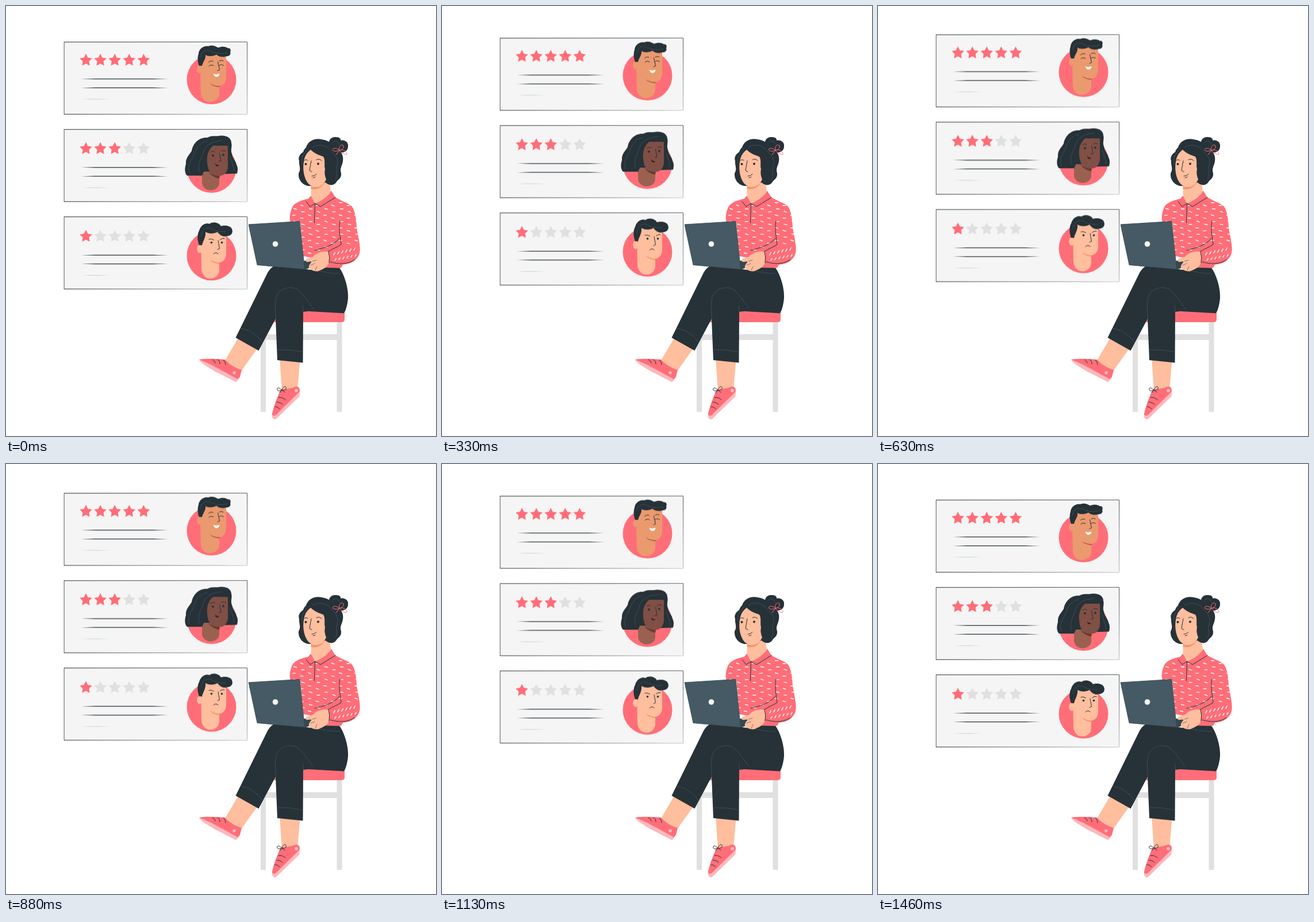
Animation, 748 px wide and 748 px high, one loop 1.5 s. Source, as an HTML page:

```html
<!DOCTYPE html>
<html lang="en">
<head>
<meta charset="utf-8">
<title>Customer reviews</title>
<style>
  html, body { margin: 0; width: 100%; height: 100%; overflow: hidden; background: #fff; }
  svg { display: block; width: 100vw; height: 100vh; }
  .pink { fill: #ff6e78; }
  .pale { fill: #ffb8bd; }
  .dark { fill: #263238; }
  .grey { fill: #e0e0e0; }
  .skin { fill: #ffbe9d; }
  .tan { fill: #eb996e; }
  .ink, .thin, .dash { fill: none; stroke: #263238; stroke-linecap: round; stroke-linejoin: round; }
  .ink { stroke-width: 1; }
  .thin { stroke: #455a64; stroke-width: .7; }
  .dash { stroke: #fff; stroke-width: 1.4; }
  #cards { animation: float 1.5s -4ms infinite; }
  @keyframes float {
    0% { transform: translateY(0); animation-timing-function: steps(18, jump-none); }
    50% { transform: translateY(-14.4px); animation-timing-function: steps(18, jump-none); }
    100% { transform: translateY(0); }
  }
</style>
</head>
<body>
<svg viewBox="0 0 748 748">
  <defs>
    <path id="star" d="M0-11.4 3.4-4.7 10.8-3.5 5.5 1.8 6.7 9.2 0 5.8-6.7 9.2-5.5 1.8-10.8-3.5-3.4-4.7Z"/>
    <g id="panel">
      <path fill="#f5f5f5" d="M101 62.7H419.5V188.2H101Z"/>
      <path class="dark" fill-rule="evenodd" d="M100.7 62.2H419.8L419.5 188.2 100.7 188.7ZM101.5 63.2V187.8L419.2 187.9 419 63Z"/>
    </g>
    <g id="info">
      <path class="dark" d="M130 126.900 155 126.300H255L282 127 255 127.500H155ZM130 142.300 155 141.700H255L282 142.400 255 142.900H155Z"/>
      <path fill="#cfd2d3" d="M131 162 145 161.500H160L184 162 160 162.500H145Z"/>
      <circle class="pink" cx="357.5" cy="128" r="43"/>
    </g>
    <path id="shirt" d="M527 335C512 338 500 343 497 352 493 362 493 370 495 377L512 375 517 435 532 438 545 456 583 455.500 586 450C600 449 612 442 615 430 618 420 612 400 610 385 609 365 606 352 600 347 592 341 578 337 572 332L566 322 531 331Z"/>
    <clipPath id="cloth"><use href="#shirt"/></clipPath>
  </defs>

  <g id="cards">
    <use href="#panel"/><use href="#panel" y="152"/><use href="#panel" y="304"/>
    <use href="#info"/><use href="#info" y="153.900"/><use href="#info" y="306.400"/>
    <g id="stars"></g>

    <g>
      <ellipse class="tan" cx="337" cy="110" rx="4.800" ry="7"/>
      <path class="tan" d="M341 98 338 122 339 152C340 162 347 168 356 167 365 166 371 160 371 152V139.500C379 138 383 132 383 122V86L345 82Z"/>
      <path fill="#a35c3a" d="M355 134.500C360 138 366 139.300 372 139.300L371 141C364 140.500 358 138.500 355 134.500Z"/>
      <path class="dark" d="M336 104C333 97 333 88 335 83 335 76 343 68 352 70 358 67 365 70 369 72.500 375 70 382 70 386 73.500 390 72 392 77 390 80 392 84 388 88 383 87.500 377 90 370 88 366 84.500 360 88 351 88 347 85 348 92 343 96 341 104Z"/>
      <path class="thin" d="M338 89C340 79 348 75 355 78 365 83 376 84 385 81"/>
      <path class="ink" d="M352.500 97.500Q356 94 360 96M371 95.500Q375 93 378 95.500M353 104.500Q357 101 361 104M370.500 103.500Q375 100.500 378.500 103.500M368.500 97 371.500 111 368 112.500"/>
      <path fill="#fff" d="M360.500 117.500C364 119.500 368 119 371.500 117.500 371 124.500 362.500 126 360.500 117.500Z"/>
    </g>

    <g>
      <path class="dark" d="M315 295C310 290 311 281 313 275 312 264 319 259 323 252 325 239 336 228 350 229 357 225 364 227 370 226 384 224 392 230 392 238 394 244 390 250 393 257 394 266 400 269 401 276 404 281 403 287 402 291.500L383 292 342 295Z"/>
      <path fill="#9a6150" d="M341 288V308C342 316 349 321 357 320.500 365 320 371 315 371 307V288Z"/>
      <path fill="#683a30" d="M352 288C358 293 365 295.500 372 295.300L371 300C364 299 356 295 352 288Z"/>
      <path fill="#804f45" d="M353 243C348 258 349 276 353 286 359 295 368 296 375 295 382 293 386 286 386 278V243Z"/>
      <path class="dark" d="M341 295C347 285 348 272 350 263 351 252 357 245 363 241 372 236 384 237 387 247L391 240 386 230 358 229 338 244 332 294Z"/>
      <path class="thin" d="M319 290C314 276 324 268 327 258 331 247 337 237 350 236M337 289C331 276 341 264 344 252 349 240 360 235 376 234M390 263C391 270 397 277 396 288"/>
      <g class="dark"><circle cx="360" cy="260" r="1.900"/><circle cx="378" cy="259" r="1.900"/></g>
      <path class="ink" d="M356 254Q359 251 363 253.500M375 252.500Q378 250 382 252.500M371.500 256 374 269.500 370.500 270"/>
      <path fill="#401f1c" d="M364 273.500 366.500 276 371 277C368 280 364 279.500 364 273.500Z"/>
    </g>

    <g>
      <ellipse class="skin" cx="337" cy="422.500" rx="4.800" ry="7"/>
      <path class="skin" d="M342 406 339.500 430 340 458C341 468 348 475 357 474 366 473 371 467 371 458V446.500C379 445 383 439 383 430V394L346 390Z"/>
      <path class="tan" d="M355 441C360 444.500 366 446.500 372 446.500L371 448.500C364 448 358 445.500 355 441Z"/>
      <path class="dark" d="M336 416C332 406 333 396 336 391 338 382 347 376 354 379 360 374 371 377 374 383 380 381 391 382 393 388 396 395 391 400 384 400.500 377 402 371 398 368 393 361 397 352 396 347 393 348 402 343 408 341 416Z"/>
      <path class="thin" d="M339 400C341 388 349 384 357 387 363 391 374 394 383 392"/>
      <g class="dark"><circle cx="357.500" cy="411.500" r="1.800"/><circle cx="375.500" cy="411.500" r="1.800"/></g>
      <path class="ink" d="M353 405.500Q357 404 361.500 407M372.500 406.500Q376 403.500 380 404.500M369 408 371.500 422 368 423.500M361 431.500Q364.500 427 369 431"/>
    </g>
  </g>

  <g id="chair">
    <path class="grey" d="M443 560H452V706H443ZM575.500 545H584.500V706H575.500ZM450 571H578V581H450Z"/>
    <path class="pink" d="M466 531H589V545Q589 550 584 550H466Z"/>
  </g>

  <g id="feet">
    <path class="skin" d="M406 574 437 596 410 634C397 633 387 626 380 618ZM476 612 511.500 616 507 668 480 670Z"/>
    <path class="pink" d="M336 615C350 613 367 614 381 615 388 623 399 630 410 633L407 645 400 654C384 645 355 632 345 623Z"/>
    <path class="pale" d="M336 615C343 618 350 621 357 624L403 649 400 654 355 630C346 625 339 621 336 615Z"/>
    <circle class="pale" cx="397" cy="638" r="2.800"/>
    <path class="ink" d="M359 615.500Q363 616 364 621M368 615.500Q372 616 372 622.500M378 616Q382 618 382 624"/>
    <path class="pink" d="M478 667C472 680 466 695 463 709 462 717 466 720 470 718L510 679 511 667C508 660 504 662 499 664 491 666 485 666 478 667Z"/>
    <path class="pale" d="M510.500 671V679L470 718C466 720 462 717 463 711 466 714 468 713 471 710Z"/>
    <circle class="pale" cx="505" cy="669" r="3"/>
    <path class="ink" d="M480 668C472 660 470 667 473 669 476 670 478 669 480 668 482 660 489 661 487 666 485 669 482 669 480 668L476 673M480 668 485 672M474 681Q481 680 486 685M471 689Q477 689 481 693M468 697Q473 697 476 701"/>
  </g>

  <g id="body">
    <use class="pink" href="#shirt"/>
    <g id="weave" class="dash" clip-path="url(#cloth)"></g>
    <path class="skin" d="M531 296 530.500 326C531 334 534 340 538 343.500 550 341 560 333 565 324L562 296Z"/>
    <path class="tan" d="M530.500 314C541 316 549 312 555 305 552 315 541 321 530.500 318Z"/>
    <path class="pink" d="M530 330 522 340 529 349 537.500 343.500ZM566 322 573 333 547 349 537.500 343.500C548 340 559 332 566 322Z"/>
    <path class="ink" d="M522 340 529 349 537.500 343.500 547 349 573 333M537.500 343.500 536.500 377M581 374C578 390 582 403 583 415 576 420 568 422 561 427M580 404C570 417 552 421 537 425M606 441C597 449 578 450 564 445"/>
  </g>

  <g id="legs">
    <path class="dark" d="M399.500 577 455 464C462 451 475 446 490 449 505 452 520 458 531 459L545 455 580 455.500C588 466 596 490 595 508 594 520 591 530 588 534.500L526 531 517 532 516.500 620.500 472 616 469 544 439.500 599.500Z"/>
    <path class="thin" d="M469.500 545C468 522 467 506 475 498 483 489 500 487 509 495 519 504 527 518 534 526M517 532 516.500 522M408 561C420 562 435 569 445 584M471.500 598Q494 597 516.500 602M543 460Q563 466 579 465"/>
  </g>

  <g id="laptop">
    <path fill="#37474f" d="M514 444 530 441 534 454 519 458.500Z"/>
    <path fill="#455a64" stroke="#37474f" stroke-width=".8" stroke-linejoin="round" d="M422 380 511 374.500 519.500 458 437 450.500Z"/>
    <circle fill="#f5f5f5" cx="468.500" cy="414" r="4.800"/>
    <path class="skin" d="M562 428C551 425 541 429 534 436L523 440C519 442 521 446 526 445L533 444C528 448 524 455 529 458 534 461 541 463 546 460 554 457 561 452 562 446Z"/>
    <path class="thin" stroke="#eb996e" d="M533 444 540 442M530 451 537 448M538 460 541 453"/>
    <path class="ink" d="M561 427Q564 437 562 447"/>
  </g>

  <g id="head">
    <path class="dark" d="M563 244C559 235 565 227 574 228 580 228 583 231 582 234 590 232 596 238 595 244 595 251 590 255 583 255L570 256Z"/>
    <path class="dark" d="M522 246C525 235 537 229 549 232 560 233 568 240 572 246 582 250 588 260 586 270 585 278 580 282 583 291 584 300 577 302 575 306 571 313 562 313 556 307L530 313C518 314 508 304 509 291 514 283 509 277 510 270 507 261 514 256 517 254 518 250 520 248 522 246Z"/>
    <path class="skin" d="M530 250C523 255 519 262 518 271 516 283 518 295 522 303 527 314 538 317 547 313 555 309 560 300 558 285L556 263C548 261 537 257 530 250Z"/>
    <path class="dark" d="M530 249C536 256 546 259 552 262 556 268 553 277 555 284 553 293 556 302 562 309L578 297 573 250 540 238Z"/>
    <path class="thin" d="M533 246C543 239 557 242 565 251 573 260 580 267 576 278 573 288 578 294 573 303M526 248C517 257 513 265 515 275M568 237Q575 231 580 240"/>
    <path fill="none" stroke="#ff6e78" d="M580 251C574 245 566 248 569 251 572 254 577 252 580 251 578 244 584 239 587 243 588 247 584 251 580 251 586 248 594 254 593 258 588 259 583 255 580 251L574 259"/>
    <g class="dark"><circle cx="521.500" cy="275" r="2"/><circle cx="543" cy="274.500" r="2"/></g>
    <path class="ink" d="M518.500 269Q521 266 525 268.500M540 267.500Q545 264.500 549 269M531 269 528 286 532 288.500"/>
    <path class="ink" stroke="#7c3b3e" d="M532 296Q537 296 540 292.500M534 299 538 297.500"/>
  </g>
</svg>
<script>
  const add = (id, tag, attrs) => {
    const el = document.createElementNS('http://www.w3.org/2000/svg', tag);
    for (const key in attrs) el.setAttribute(key, attrs[key]);
    document.getElementById(id).append(el);
  };

  [[94.5, 5], [248.2, 3], [400.8, 1]].forEach(([y, score]) => {
    for (let i = 0; i < 5; i++)
      add('stars', 'use', { href: '#star', x: 139 + i * 25.1, y, class: i < score ? 'pink' : 'grey' });
  });

  const tick = (x, y, angle, len) => add('weave', 'path', {
    d: `M${-len / 2} 0H${len / 2}`,
    transform: `translate(${x} ${y}) rotate(${angle})`
  });

  // Staggered columns on the torso and upper arm.
  for (let row = 0; row < 9; row++)
    for (let col = 0; col < 9; col++) {
      const x = 501 + col * 13.5 + (row % 2) * 2;
      const y = 342 + row * 11 + (col % 2) * 5;
      if (y < 418 || x < 558) tick(x, y, 12 * Math.sin(row * 2.3 + col * 1.7) + 8, 5);
    }
  // Steeper marks along the forearm.
  for (let i = 0; i < 6; i++) {
    tick(571 + i * 7, 431 - i * 1.6, -62, 5);
    tick(573 + i * 7, 441 - i * 1.4, -58, 4);
  }
</script>
</body>
</html>
```
